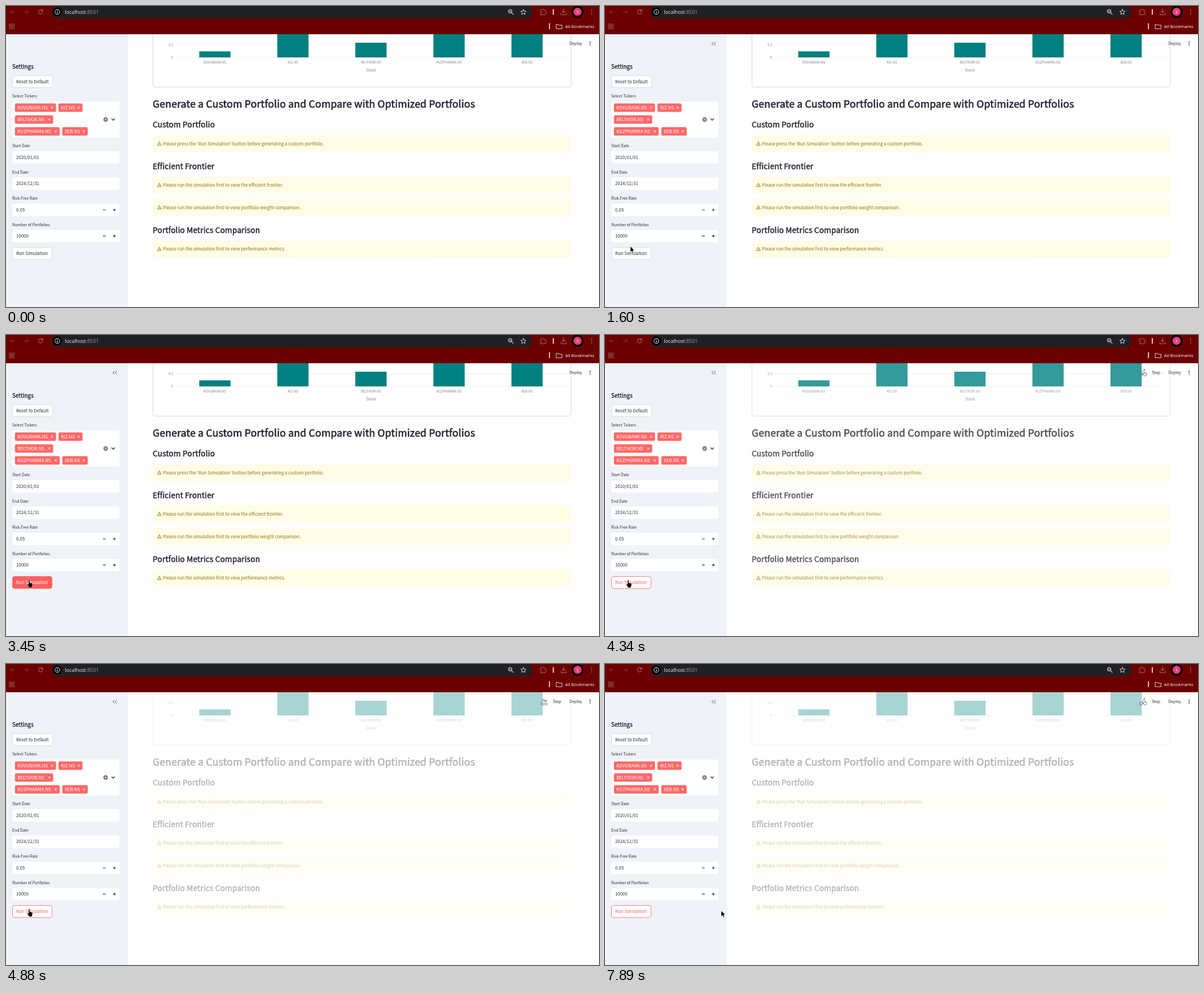
These frames come from a looping animation (1051 px wide and 533 px high, 8 s). An HTML page:

```html
<!DOCTYPE html>
<html lang="en">
<head>
<meta charset="utf-8">
<title>Portfolio settings</title>
<style>
html, body { margin: 0; width: 100%; height: 100%; overflow: hidden; background: #fff; }
svg { display: block; width: 100%; height: 100%; }
text { font-family: "Noto Sans CJK JP", "Noto Sans CJK SC", "Noto Sans CJK KR", "Noto Sans CJK", "Open Sans", sans-serif; fill: #2b2d39; }
.ui { font-family: "Open Sans", "Noto Sans", sans-serif; }
.head { fill: #242732; stroke: #242732; stroke-width: .036em; letter-spacing: .01em; }
.line { fill: none; stroke-linecap: round; stroke-linejoin: round; }
</style>
</head>
<body>
<svg id="stage" viewBox="0 0 1051 533"></svg>
<script>
const LOOP = 8000;
const EM = 0.4907; // page zoom times the font's size ratio
const INK = '#2b2d39', RED = '#ff5f5f';
const tickers = ['KOVUBANK.NS', 'KIZ.NS', 'BELTIVOR.NS', 'KUZPHARMA.NS', 'XEB.NS'];

const text = (x, y, s, px = 16, attr = '') =>
  `<text x="${x}" y="${y}" font-size="${(px * EM).toFixed(2)}" ${attr}>${s}</text>`;
const uiText = (x, y, s, size, fill) =>
  `<text class="ui" x="${x}" y="${y}" font-size="${size}" style="fill:${fill}">${s}</text>`;
const head = (x, y, s, px) => text(x, y, s, px, 'class="head"');
const rect = (x, y, w, h, fill, r = 0, attr = '') =>
  `<rect x="${x}" y="${y}" width="${w}" height="${h}" rx="${r}" fill="${fill}" ${attr}/>`;
const dot = (x, y, r, fill, attr = '') =>
  `<circle cx="${x}" cy="${y}" r="${r}" fill="${fill}" ${attr}/>`;
const line = (d, color, w = 1, attr = '') =>
  `<path class="line" d="${d}" stroke="${color}" stroke-width="${w}" ${attr}/>`;
const ring = (x, y, r, color, w = 1) => dot(x, y, r, 'none', `stroke="${color}" stroke-width="${w}"`);
const kebab = (x, y, gap, r, color) => [-gap, 0, gap].map(d => dot(x, y + d, r, color)).join('');
const cross = (x, y, r, color, w) =>
  line(`M${x - r} ${y - r}l${2 * r} ${2 * r}m0 ${-2 * r}l${-2 * r} ${2 * r}`, color, w);

function browserBar() {
  const dim = '#853b3b', mid = '#a06a68', lit = '#dcdcdc';
  const tiles = [[5.8, 31.8], [11, 31.8], [5.8, 37], [11, 37]];
  return rect(0, 0, 1051, 50, '#6c0000') +
    rect(81, -1, 852, 23, '#202124', 11.5) +
    line('M15 10.3H8m3-3-3 3 3 3', dim) +
    line('M32.5 10.3h7m-3-3 3 3-3 3', dim) +
    line('M64.4 8.2A3.7 3.7 0 1 0 65 11M65 6.3v2.6h-2.6', mid, 1.1) +
    dot(91, 10.5, 8.3, '#000') + ring(91, 10.5, 4.3, '#fff', 1) +
    line('M91 10.2v2.4M91 8.2v.1', '#fff', 1.1) +
    uiText(104.5, 14, 'localhost<tspan style="fill:#9a9da1">:8501</tspan>', 8.9, '#f1f1f1') +
    ring(893.6, 9.3, 3, lit, 1.1) + line('M896 11.8l3 3M892.3 9.3h2.6', lit, 1.1) +
    line('M917 6l1.4 3 3.3.4-2.4 2.2.6 3.3-2.9-1.6-2.9 1.6.6-3.3-2.4-2.2 3.3-.4z', lit, 1) +
    line('M947.5 7.3h2.6q.1-2 1.5-2t1.5 2h2.9v2.8q1.9.1 1.9 1.5t-1.9 1.5v2.4h-8.5v-2.7q1.6-.2 1.6-1.3t-1.6-1.3z', mid) +
    rect(969.2, 5.5, 1.6, 10, '#fff') +
    line('M988.3 5v6.6m-2.8-2.7 2.8 2.7 2.8-2.7M983.7 12.5v3h9.2v-3', mid, 1.1) +
    dot(1013, 10.3, 10.8, '#000') + dot(1013, 10.3, 7.2, '#e93c78') +
    uiText(1011, 13.1, 'S', 7.6, '#fff') +
    kebab(1038, 10.3, 3.8, 1, mid) +
    tiles.map(([x, y]) => rect(x, y, 3.6, 3.6, 'none', .3, `stroke="${mid}" stroke-width=".9"`)).join('') +
    rect(962.5, 30.5, 1.5, 10.5, '#fff') +
    line('M975.5 32.6h3.3l1.2 1.4h5.4v6.2h-9.9z', lit, 1) +
    uiText(991, 38.5, 'All Bookmarks', 7.75, '#fff');
}

function chart() {
  const centers = [370.2, 508.5, 646.8, 785.2, 923.5], tops = [80.3, 49, 65, 49, 49];
  const tick = 'style="fill:#7f828c"';
  return rect(260.5, 30, 741, 113.7, '#fff', 4, 'stroke="#d6d7db"') +
    rect(301, 68, 692, .8, '#e8eaef') +
    rect(301, 90.7, 692, .8, '#e8eaef') +
    centers.map((x, i) =>
      rect(x - 27.7, tops[i], 55.4, 91 - tops[i], '#008080') +
      text(x, 102.3, tickers[i], 12, `text-anchor="middle" ${tick}`)).join('') +
    text(296.3, 70.8, '0.2', 12, `text-anchor="end" ${tick}`) +
    text(296.3, 93.2, '0', 12, `text-anchor="end" ${tick}`) +
    text(647, 116.2, 'Stock', 14, `text-anchor="middle" ${tick}`);
}

function warning(y, s) {
  return rect(260, y - 15.2, 742, 30.5, '#fffce7', 4) +
    line(`M272 ${y - 3.2}l3.4 6.1h-6.8z`, '#926c05', .8) +
    line(`M272 ${y - 1}v1.8m0 1.1v.1`, '#926c05', .8) +
    text(278, y + 2.9, s, 16, 'style="fill:#926c05"');
}

function mainPage() {
  return chart() +
    head(260, 180.2, 'Generate a Custom Portfolio and Compare with Optimized Portfolios', 36) +
    head(260, 215.4, 'Custom Portfolio', 28) +
    warning(243.8, "Please press the 'Run Simulation' button before generating a custom portfolio.") +
    head(260, 289.2, 'Efficient Frontier', 28) +
    warning(317, 'Please run the simulation first to view the efficient frontier.') +
    warning(356.7, 'Please run the simulation first to view portfolio weight comparison.') +
    head(260, 402.2, 'Portfolio Metrics Comparison', 28) +
    warning(430.4, 'Please run the simulation first to view performance metrics.');
}

function chip(i, x, y, w) {
  return rect(x, y - 7.6, w, 15.2, '#ff6868', 2.5) +
    text(x + 4.5, y + 2.9, tickers[i], 16, 'style="fill:#fff"') +
    cross(x + w - 7, y, 1.6, '#fff', 1);
}

function field(y, label, value, stepper) {
  return text(11, y - 17.6, label, 14) +
    rect(11, y - 11, 190.3, 22, '#fff', 4) +
    text(18, y + 2.9, value) +
    (stepper ? line(`M172.2 ${y}h4M190 ${y}h4m-2-2v4`, INK, 1.2) : '');
}

function sidebar() {
  return rect(0, 50, 216, 483, '#eff2f7') +
    head(11, 110.6, 'Settings', 20) +
    rect(11.5, 123.3, 71.2, 21.2, '#fff', 4, 'stroke="#d3d5db" stroke-width=".8"') +
    text(18, 136.7, 'Reset to Default') +
    text(11, 162.4, 'Select Tickers', 14) +
    rect(11, 169, 190.3, 64, '#fff', 4) +
    chip(0, 15.8, 180, 72.8) + chip(1, 93, 180, 42.7) +
    chip(2, 15.8, 201, 67.8) +
    chip(3, 15.8, 222, 79.4) + chip(4, 99.8, 222, 45) +
    dot(176.6, 201, 4, '#777880') + cross(176.6, 201, 1.4, '#fff', .9) +
    line('M187.6 199.8l2.4 2.4 2.4-2.4', INK, 1.3) +
    field(268, 'Start Date', '2020/01/01') +
    field(314.5, 'End Date', '2024/12/31') +
    field(361, 'Risk-Free Rate', '0.05', true) +
    field(407.4, 'Number of Portfolios', '10000', true);
}

// Running indicator: small sport figures, each a head and some strokes
const figure = (hx, hy, d) => dot(hx, hy, 1.3, '#6d6f79') + line(d, '#6d6f79', 1);
const waves = 'M.6 9.6q1.5-1.2 3 0t3 0 3 0 3 0M.6 12.2q1.5-1.2 3 0t3 0 3 0 3 0';
const sports = [
  figure(6.5, 1.4, 'M1.2 4.3h10.6M5.6 4.6v8.2M7.4 4.6v8.2M6.5 4.5v4'),
  figure(8.6, 1.5, 'M3 6l2-2h3l1.6 2.4H12M7.4 4.3L6 7.8l2.4 2v3M5.8 8.2l-1.6 2.6H1.4'),
  ring(3, 10, 2.7, '#6d6f79', .9) + ring(10.4, 10, 2.7, '#6d6f79', .9) +
    figure(8.8, 1.6, 'M6.8 10.3V8L5 6.3l2.6-2.4 1.6 1.9h2.2'),
  figure(7, 1.4, 'M4 7l1-2.6h2.4l1.4 2 1.8.6M6.8 4.6L6.2 8l2 2 .6 2.8M6 8.4l-2 4.4'),
  figure(7, 2.2, 'M6.4 4.4L5 8h4l2.4-2.6M7 5l3 1M.6 9.6h12M2.4 12.2q4 1.4 8.4 0'),
  figure(10.2, 5.2, `M2.6 3l3.8-.6 2 3.4M1.6 7.4l4.8-2.8 2.6 2.4${waves}`)
];
const late = [5840, 6090, 6220, 6490, 6620, 6880, 7010, 7220, 7430, 7620, 7890];

function sportAt(t) {
  const n = t < late[0]
    ? Math.floor((t - late[0]) / 200) - 2
    : late.filter(s => s <= t).length - 3;
  return (n % 6 + 6) % 6;
}

// Pointer moves: start, end, steps, x0, y0, x1, y1
const moves = [
  [190, 320, 3, 1150, 520, 694, 466],
  [580, 730, 3, 694, 466, 340, 456],
  [990, 1200, 4, 340, 456, -120, 434],
  [1390, 1600, 4, -20, 436, 45, 425.5],
  [2510, 2620, 3, 45, 425.5, 41, 433.6],
  [5220, 5220, 1, 41, 433.6, 47, 433.8],
  [5370, 5690, 6, 47, 433.8, 206, 436.8]
];

function pointerAt(t) {
  const move = moves.filter(m => m[0] <= t).pop();
  if (!move) return [-50, 0];
  const [t0, t1, n, x0, y0, x1, y1] = move;
  const done = t1 > t0 ? Math.floor((t - t0) / (t1 - t0) * (n - 1) + 1e-6) + 1 : n;
  const k = Math.min(1, done / n);
  return [x0 + (x1 - x0) * k, y0 + (y1 - y0) * k];
}

// CSS ease-in: cubic-bezier(.42, 0, 1, 1)
function easeIn(x) {
  let lo = 0, hi = 1;
  for (let i = 0; i < 20; i++) {
    const s = (lo + hi) / 2;
    if (3 * (1 - s) * (1 - s) * s * 0.42 + 3 * (1 - s) * s * s + s ** 3 < x) lo = s; else hi = s;
  }
  return 3 * (1 - lo) * lo * lo + lo ** 3;
}

const stage = document.getElementById('stage');
stage.innerHTML =
  rect(0, 0, 1051, 533, '#fefefe') +
  `<g id="page">${mainPage()}</g>` +
  `<g id="busy">${sports.map(s => `<g class="sport" transform="translate(947 60)">${s}</g>`).join('')}` +
  `${text(969.2, 68.9, 'Stop', 14)}</g>` +
  text(998.5, 68.9, 'Deploy', 14) + kebab(1035.3, 66.5, 2.8, .9, INK) +
  sidebar() +
  `<g id="fold">${line('M192 64l-2.7 2.7 2.7 2.7M196 64l-2.7 2.7 2.7 2.7', 'inherit', 1)}</g>` +
  rect(11.5, 427.6, 70.1, 21.3, '#fff', 4, 'id="run" stroke-width=".8"') +
  text(18, 441.2, 'Run Simulation', 16, 'id="runText"') +
  browserBar() +
  '<g id="pointer" stroke="#fff" stroke-width=".5">' +
  '<path id="arrow" d="M0 0V10.2L2.3 8.1 3.9 11.7 5.6 10.9 4 7.4H7.2Z"/>' +
  '<path id="hand" d="M-1 1q0-1 1-1t1 1v4l3.8.9q1.6.4 1.4 2l-.6 3q-.3 1.3-1 1.9v1.2h-4.8v-1.2l-3-3.9q-.7-1.4.6-1.5l1.6 1z"/></g>';

const el = {};
for (const node of stage.querySelectorAll('[id]')) el[node.id] = node;
const figures = [...stage.querySelectorAll('.sport')];
const foldPath = el.fold.firstChild;
const show = (node, on) => node.setAttribute('display', on ? 'inline' : 'none');

function draw(t) {
  const fade = Math.max(0, Math.min(1, (t - 3840) / 1000));
  el.page.setAttribute('opacity', 1 - 0.67 * easeIn(fade));

  show(el.busy, t >= 3840);
  const sport = sportAt(t);
  figures.forEach((f, i) => show(f, i === sport));

  show(el.fold, t >= 1060);
  foldPath.setAttribute('stroke', t < 1390 ? '#a8465a' : '#4c4e59');

  const hot = (t >= 1130 && t < 1390) || t >= 2510;
  const pressed = t >= 3380 && t < 3480;
  el.run.setAttribute('stroke', hot ? RED : '#d3d5db');
  el.run.setAttribute('fill', pressed ? RED : '#fff');
  el.runText.style.fill = pressed ? '#fff' : hot ? RED : INK;

  const [x, y] = pointerAt(t);
  const onButton = t >= 2510 && x < 82;
  el.pointer.setAttribute('transform', `translate(${x} ${y})`);
  show(el.hand, onButton);
  show(el.arrow, !onButton);
}

const start = performance.now();
function tick() {
  draw((performance.now() - start) % LOOP);
  requestAnimationFrame(tick);
}
tick();
</script>
</body>
</html>
```
